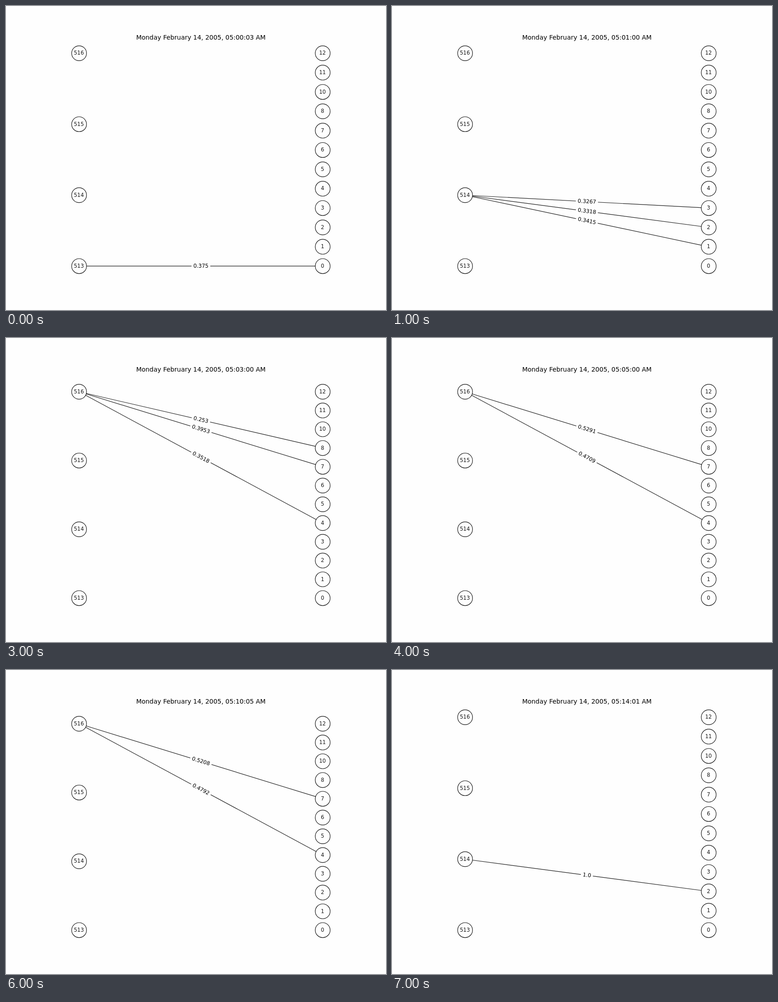
These frames come from a looping animation (837 by 669 pixels, 8 s). An HTML page:

```html
<!DOCTYPE html>
<html lang="en">
<head>
<meta charset="utf-8">
<style>
  html, body { margin: 0; width: 100%; height: 100%; overflow: hidden; background: #fefefe; }
  svg { display: block; }
  text { font: 11.63px "DejaVu Sans", sans-serif; text-anchor: middle; }
  .title { font-size: 13.95px; }
  .node { fill: #1a1a1a; }
  circle { fill: #fefefe; stroke: #111; stroke-width: 1.16; }
  line { stroke: #1a1a1a; stroke-width: 1.16; }
  rect { fill: #fefefe; }
</style>
</head>
<body>
<svg id="stage" width="837" height="669" viewBox="0 0 837 669"></svg>
<script>
const LEFT_X = 161, RIGHT_X = 697.6, MID_X = (LEFT_X + RIGHT_X) / 2, BOTTOM = 572.4;
const TALL = 104, SHORT = 118.3;
const left = [513, 514, 515, 516];
const right = [0, 1, 2, 3, 4, 5, 6, 7, 8, 10, 11, 12];

// Each step: clock, y of the top row, left node, [right node, weight] pairs
const steps = [
  ["05:00:03", TALL, 513, [[0, "0.375"]]],
  ["05:01:00", TALL, 514, [[1, "0.3415"], [2, "0.3318"], [3, "0.3267"]]],
  ["05:02:01", TALL, 515, [[4, "0.3623"], [5, "0.3225"], [6, "0.3152"]]],
  ["05:03:00", SHORT, 516, [[4, "0.3518"], [7, "0.3953"], [8, "0.253"]]],
  ["05:05:00", SHORT, 516, [[4, "0.4709"], [7, "0.5291"]]],
  ["05:10:00", TALL, 514, [[2, "0.3559"], [10, "0.3167"], [11, "0.3274"]]],
  ["05:10:05", SHORT, 516, [[4, "0.4792"], [7, "0.5208"]]],
  ["05:14:01", TALL, 514, [[2, "1.0"]]],
];

const rowY = (column, name, top) =>
  BOTTOM - (BOTTOM - top) * column.indexOf(name) / (column.length - 1);

const node = (x, y, name) =>
  `<circle cx="${x}" cy="${y}" r="16.4"/><text class="node" x="${x - 0.5}" y="${y + 3.4}">${name}</text>`;

function weightLabel(y1, y2, weight) {
  const angle = Math.atan2(y2 - y1, RIGHT_X - LEFT_X) * 180 / Math.PI;
  const width = 11.63 * (0.636 * (weight.length - 1) + 0.318) + 8.1;
  return `<g transform="translate(${MID_X} ${(y1 + y2) / 2}) rotate(${angle})">` +
    `<rect x="${-width / 2}" y="-9.7" width="${width}" height="19.4" rx="3.5"/>` +
    `<text y="3.4">${weight}</text></g>`;
}

function render([clock, top, from, edges]) {
  const y1 = rowY(left, from, top);
  const ends = edges.map(([to, weight]) => [rowY(right, to, top), weight]);
  return [
    `<text class="title" x="${MID_X}" y="73.6">Monday February 14, 2005, ${clock} AM</text>`,
    ...ends.map(([y2]) => `<line x1="${LEFT_X}" y1="${y1}" x2="${RIGHT_X}" y2="${y2}"/>`),
    ...left.map(name => node(LEFT_X, rowY(left, name, top), name)),
    ...right.map(name => node(RIGHT_X, rowY(right, name, top), name)),
    ...ends.map(([y2, weight]) => weightLabel(y1, y2, weight)),
  ].join("");
}

const stage = document.getElementById("stage");
let shown = -1;
function tick() {
  const index = Math.floor(performance.now() / 1000) % steps.length;
  if (index !== shown) stage.innerHTML = render(steps[shown = index]);
  requestAnimationFrame(tick);
}
tick();
</script>
</body>
</html>
```
